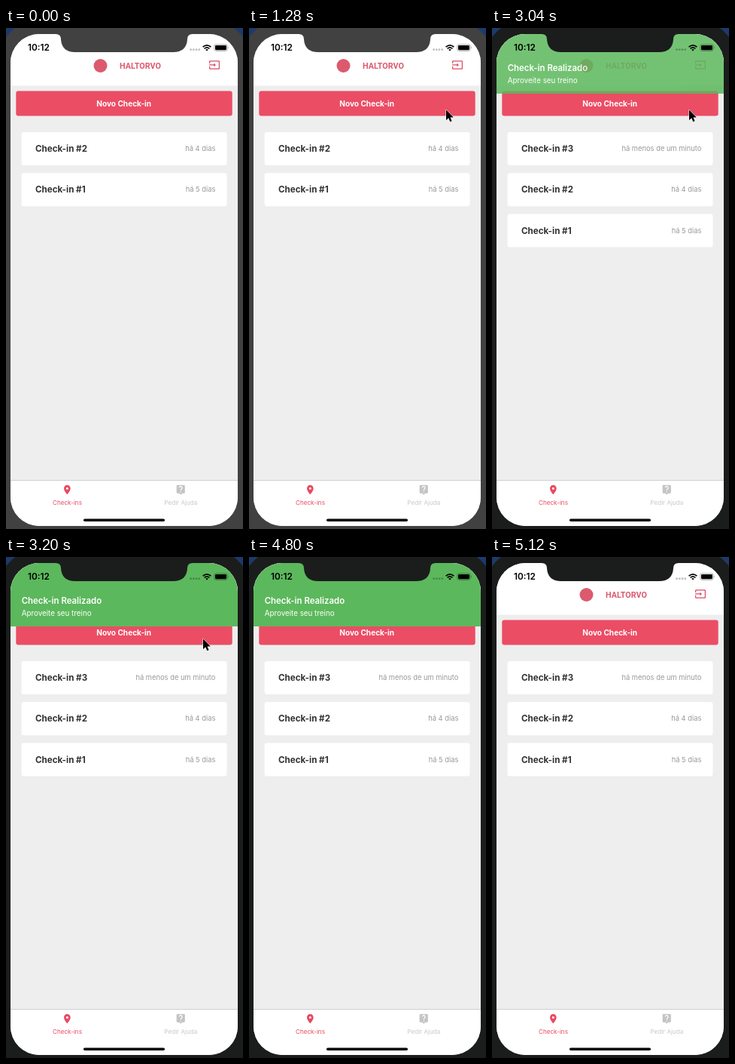
These frames come from a looping animation (315x664 px, 5600 ms). An HTML page:

```html
<!DOCTYPE html>
<html lang="pt-BR">
<head>
<meta charset="utf-8">
<title>Check-ins</title>
<style>
  html, body { margin: 0; width: 100%; height: 100%; overflow: hidden; background: #1d3a6b; }
  svg { display: block; width: 315px; height: 664px; }
  text { font-family: Inter, "Open Sans", sans-serif; }
  .title { font-size: 11.6px; font-weight: 700; fill: #333; }
  .age { font-size: 9.35px; fill: #999; text-anchor: end; }
  .tab { font-size: 8.1px; text-anchor: middle; }
  .brand { font: 700 10.8px Roboto, sans-serif; fill: #dc5a6e; }
</style>
</head>
<body>
<svg viewBox="0 0 315 664">
  <defs>
    <clipPath id="screen"><rect x="6" y="8" width="302" height="652" rx="38"/></clipPath>
  </defs>

  <rect width="315" height="664" fill="#1d3a6b"/>
  <rect id="bezel" x="-9" y="-9" width="333" height="696" rx="50"/>

  <g clip-path="url(#screen)">
    <rect x="6" y="8" width="302" height="652" fill="#eee"/>
    <rect x="6" y="8" width="302" height="68.5" fill="#fff"/>

    <circle cx="125.5" cy="50" r="9" fill="#dc5a6e"/>
    <text class="brand" x="151" y="54">HALTORVO</text>
    <path transform="translate(269.4 41.3) scale(.636)" fill="#dc4c66"
      d="M21 3H3c-1.1 0-2 .9-2 2v4h2V5h18v14H3v-4H1v4c0 1.1.9 2 2 2h18c1.1 0 2-.9 2-2V5c0-1.1-.9-2-2-2zM11 16l4-4-4-4v3H1v2h10z"/>

    <rect x="13.3" y="83.6" width="287.4" height="33" rx="3" fill="#eb4d65"/>
    <text x="156.7" y="103.6" font-size="10.1" font-weight="700" fill="#fff" text-anchor="middle">Novo Check-in</text>

    <g id="cards"></g>

    <rect x="6" y="599" width="302" height="61" fill="#fff"/>
    <rect x="6" y="599" width="302" height="1" fill="#cfcfcf"/>
    <path transform="translate(73.9 604.6) scale(.62)" fill="#e84a62" fill-rule="evenodd"
      d="M12 2C8.1 2 5 5.1 5 9c0 5.25 7 13 7 13s7-7.75 7-13c0-3.9-3.1-7-7-7zm0 4.5a2.5 2.5 0 1 1 0 5 2.5 2.5 0 0 1 0-5z"/>
    <text class="tab" x="81.5" y="631.6" fill="#e84a62">Check-ins</text>
    <g transform="translate(224.8 604.4) scale(.62)">
      <path fill="#c4c4c4" d="M19 2H5c-1.1 0-2 .9-2 2v14c0 1.1.9 2 2 2h4l3 3 3-3h4c1.1 0 2-.9 2-2V4c0-1.1-.9-2-2-2z"/>
      <path d="M9 8a3 3 0 1 1 5.2 2C13 11.3 12 12 12 14" fill="none" stroke="#fff" stroke-width="2"/>
      <rect x="11" y="16" width="2" height="2" fill="#fff"/>
    </g>
    <text class="tab" x="232.3" y="631.6" fill="#c8c8c8">Pedir Ajuda</text>

    <g id="toast">
      <rect x="6" y="-20" width="302" height="112" fill="#5cb85c"/>
      <text x="20.7" y="61.8" font-size="11.4" font-weight="600" fill="#fff">Check-in Realizado</text>
      <text x="20.7" y="78" font-size="9.8" fill="#fff">Aproveite seu treino</text>
    </g>

    <text x="29" y="30.3" font-size="11.8" font-weight="600">10:12</text>
    <g fill="#000" fill-opacity=".25">
      <circle cx="245.6" cy="28.7" r="1.4"/><circle cx="249.3" cy="28.7" r="1.4"/>
      <circle cx="253" cy="28.7" r="1.4"/><circle cx="256.7" cy="28.7" r="1.4"/>
    </g>
    <g fill="none" stroke="#000" stroke-width="1.7">
      <path d="M261.6 25.2Q267 20.4 272.4 25.2"/>
      <path d="M263.6 27.3Q267 24.4 270.4 27.3"/>
    </g>
    <path d="M265.2 28.8Q267 27.3 268.8 28.8L267 30.6Z"/>
    <rect x="276.8" y="21.8" width="17.4" height="8.6" rx="2.4" fill="none" stroke="#000" stroke-opacity=".4" stroke-width=".8"/>
    <rect x="278" y="23" width="15" height="6.2" rx="1.4"/>
    <path d="M295 24.6q1.4 1.5 0 3z" fill-opacity=".45"/>
    <rect x="103" y="650.6" width="108" height="3.5" rx="1.75"/>
  </g>

  <path id="notch" d="M66 7V8Q73 8 73 15Q74 32 92 32H222Q240 32 241 15Q241 8 248 8V7Z"/>

  <path id="cursor" d="M0 0V13.8L3.2 10.9L5.3 15.8L7.6 14.8L5.5 10H9.8Z"
    fill="#000" stroke="#fff" stroke-width="1" paint-order="stroke"/>
</svg>
<script>
  const LOOP = 5600;
  const byId = id => document.getElementById(id);
  const [bezel, notch, cards, toast, cursor] = ["bezel", "notch", "cards", "toast", "cursor"].map(byId);

  // Step tracks: [start time, value...]
  const cursorTrack = [
    [0], [480, 302, 247], [640, 277, 161], [800, 267, 120], [960, 262, 108.4],
    [3840, 252, 247], [4000, 264, 407], [4160, 281.7, 453.2], [4640]
  ];
  // Vertical offset and opacity
  const toastTrack = [
    [0, 0, 0], [3040, -5, .86], [3200, 0, 1], [4960, -15.5, .54], [5120, 0, 0]
  ];
  const FOCUS_AT = 1760, ADD_AT = 3040;

  const stepAt = (track, t) => track.filter(step => step[0] <= t).pop().slice(1);

  const card = (row, number, age) => `<g transform="translate(0 ${row * 54.2})">
    <rect x="20.6" y="138" width="272.9" height="44" rx="3" fill="#fff"/>
    <text class="title" x="39" y="164.2">Check-in #${number}</text>
    <text class="age" x="278.4" y="163.3">${age}</text></g>`;

  const ages = ["há 5 dias", "há 4 dias", "há menos de um minuto"];
  let shown = 0;

  function showCards(count) {
    if (count === shown) return;
    shown = count;
    cards.innerHTML = ages.slice(0, count).map((age, i) => card(count - 1 - i, i + 1, age)).join("");
  }

  function draw(t) {
    const shell = t < FOCUS_AT ? "#414141" : "#1b1d1c";
    bezel.setAttribute("fill", shell);
    notch.setAttribute("fill", shell);
    showCards(t < ADD_AT ? 2 : 3);

    const [offset, opacity] = stepAt(toastTrack, t);
    toast.setAttribute("transform", `translate(0 ${offset})`);
    toast.setAttribute("opacity", opacity);

    const [x, y] = stepAt(cursorTrack, t);
    cursor.setAttribute("visibility", x === undefined ? "hidden" : "visible");
    if (x !== undefined) cursor.setAttribute("transform", `translate(${x} ${y})`);
  }

  const start = performance.now();
  function tick() {
    draw((performance.now() - start) % LOOP);
    requestAnimationFrame(tick);
  }
  tick();
</script>
</body>
</html>
```
